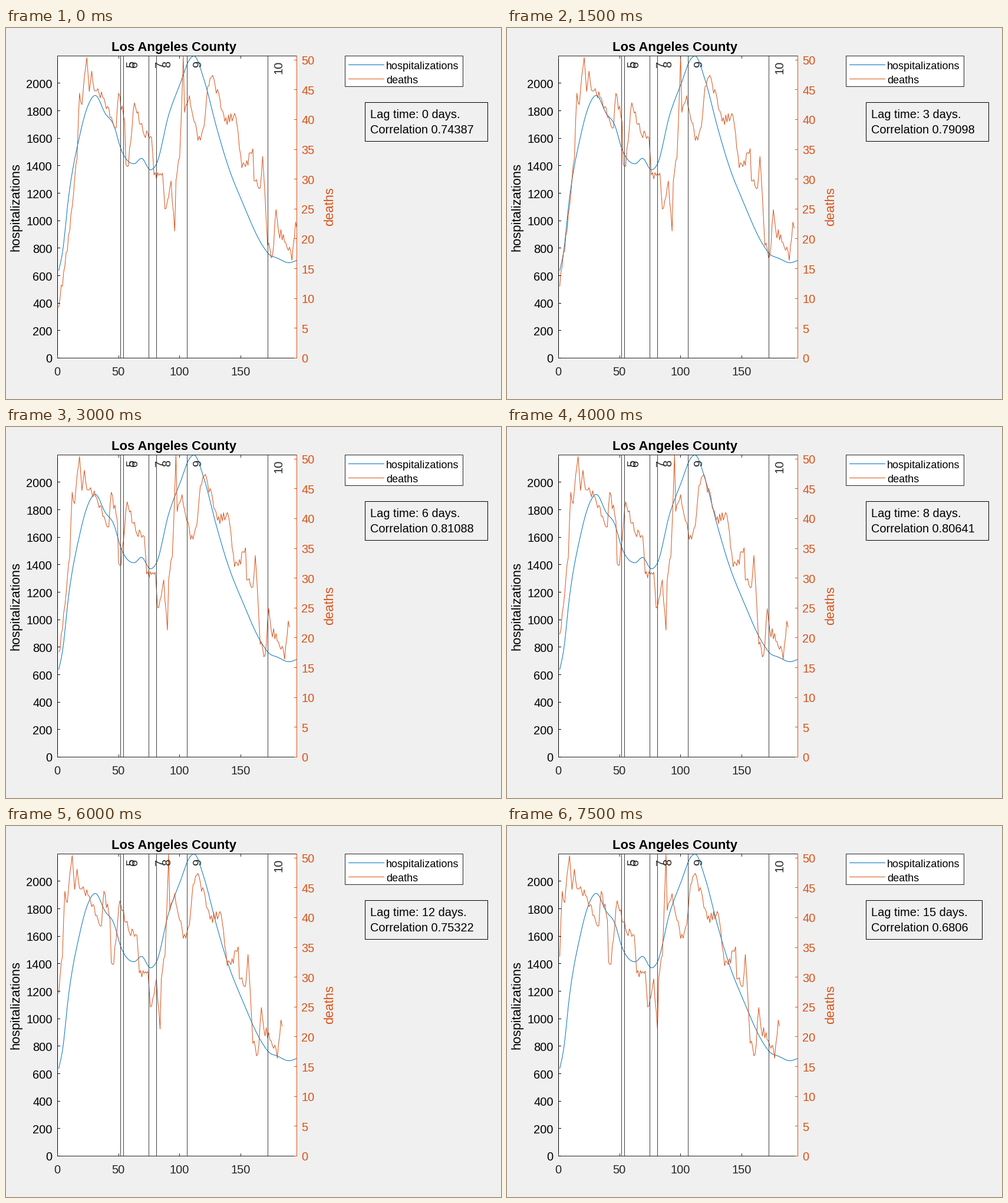
Animation, 840 px wide and 630 px high, one loop 8000 ms. Source, as a matplotlib script:

```python
import numpy as np
import matplotlib.pyplot as plt
from matplotlib.animation import FuncAnimation
from matplotlib.patches import Rectangle

plt.rcParams["font.family"] = "Liberation Sans"

W, H, DPI = 840, 630, 100
PX = 72 / DPI
X0, X1, Y0, Y1 = 87.5, 493.5, 560.5, 47.5
DAYS, LAGS, HOSP_MAX, DEATHS_MAX = 196, 16, 2199, 50.65
BLUE, ORANGE, DARK, RULE = "#0072BD", "#D95319", "#262626", "#404040"

# (day, patients): key points of a smooth curve
HOSP = [
    (1, 638), (4, 767), (9, 1169), (18, 1614), (24, 1816), (31, 1912),
    (39, 1781), (46, 1696), (52, 1520), (63, 1415), (69, 1454), (76, 1370),
    (81, 1413), (91, 1769), (100, 1987), (109, 2184), (112, 2199),
    (120, 2026), (130, 1687), (140, 1390), (151, 1143), (168, 818),
    (173, 757), (180, 728), (190, 694), (196, 711),
]

# (day, deaths): main turning points, with daily jitter between them
DEATHS = [
    (1, 8.5), (10, 21.4), (16, 33.5), (18, 44.4), (20, 42.5), (24, 50.4),
    (26, 44.7), (28, 48.1), (30, 44.9), (37, 43.7), (48, 38.6), (50, 44.4),
    (55, 39.6), (56, 32.5), (58, 32.2), (63, 42.8), (70, 38), (77, 37),
    (79, 30.7), (86, 31), (88, 25), (93, 29.7), (96, 21.3), (97, 29.7),
    (100, 33.6), (103, DEATHS_MAX), (104, 41.2), (108, 44), (115, 36.5),
    (120, 38.8), (123, 45.5), (127, 47.4), (137, 39.7), (146, 40.5),
    (151, 31.9), (154, 32.1), (160, 35.1), (161, 29.7), (166, 28.5),
    (168, 33.8), (172, 18.9), (176, 17.1), (179, 24.9), (181, 21.3),
    (190, 18.6), (192, 16.4), (195, 22.8), (196, 21.8),
]

# (lag, correlation): joined by one polynomial
CORR = [(0, 0.74387), (3, 0.79098), (6, 0.81088), (8, 0.80641),
        (10, 0.78763), (12, 0.75322), (15, 0.6806)]


def smooth(x, points):
    """Cubic Hermite curve through the points."""
    kx, ky = np.array(points, float).T
    slope = np.gradient(ky, kx)
    i = np.clip(np.searchsorted(kx, x, "right") - 1, 0, len(kx) - 2)
    h = kx[i + 1] - kx[i]
    t = (x - kx[i]) / h
    return ((1 + 2 * t) * (1 - t) ** 2 * ky[i] + t * t * (3 - 2 * t) * ky[i + 1]
            + h * t * (1 - t) * ((1 - t) * slope[i] - t * slope[i + 1]))


def jagged(x, points, amount):
    """Straight lines through the points with jitter on the other days."""
    kx, ky = zip(*points)
    noise = np.random.default_rng(4).uniform(-amount, amount, len(x))
    return np.interp(x, kx, ky) + np.where(np.isin(x, kx), 0, noise)


day = np.arange(1, DAYS + 1)
hosp = np.minimum(smooth(day, HOSP), HOSP_MAX)
deaths = jagged(day, DEATHS, 0.9)
corr = np.polyval(np.polyfit(*zip(*CORR), len(CORR) - 1), np.arange(LAGS))


def px(d):
    return X0 + d * (X1 - X0) / DAYS


def py(v, top):
    return Y0 - v * (Y0 - Y1) / top


fig = plt.figure(figsize=(W / DPI, H / DPI), dpi=DPI, facecolor="#F0F0F0")
ax = fig.add_axes([0, 0, 1, 1])
ax.set(xlim=(0, W), ylim=(H, 0))
ax.axis("off")


def curve(xs, ys, color, z):
    return ax.plot(xs, ys, color=color, lw=PX, zorder=z)[0]


# snapping adds half a pixel to straight edges, so take it off first
def line(x0, y0, x1, y1, color, z=5):
    ax.plot([x0 - 0.5, x1 - 0.5], [y0 - 0.5, y1 - 0.5], color=color, lw=PX,
            zorder=z, solid_capstyle="projecting")


def box(x0, y0, x1, y1, face, edge):
    return ax.add_patch(Rectangle((x0 - 0.5, y0 - 0.5), x1 - x0, y1 - y0,
                                  fc=face, ec=edge, lw=PX, zorder=1))


def label(x, y, s, size=20, color="black", ha="left", **kw):
    return ax.text(x, y, s, fontsize=size * PX, color=color, ha=ha,
                   va="baseline", rotation_mode="anchor", zorder=6, **kw)


# plot area, curves and numbered rules
box(X0, Y1, X1, Y0, "white", "none")
curve(px(day), py(hosp, HOSP_MAX), BLUE, 2)
moving = curve([], [], ORANGE, 3)
for n, x in enumerate((194.5, 199.5, 242.5, 255.5, 307.5, 444.5), 5):
    line(x, Y1, x, Y0, RULE, 4)
    label(x + 24, 56, str(n), color=DARK, ha="right", rotation=90)

# axes
line(X0, Y1, X1, Y1, DARK)
line(X0, Y0, X1, Y0, DARK)
line(X0, Y1, X0, Y0, "black")
line(X1, Y1, X1, Y0, ORANGE)
for d in range(0, DAYS, 50):
    x = px(d)
    line(x, Y0, x, Y0 - 4, DARK)
    line(x, Y1, x, Y1 + 4, DARK)
    label(x - 0.5, 590, str(d), color=DARK, ha="center")
for v in range(0, HOSP_MAX, 200):
    y = py(v, HOSP_MAX)
    line(X0, y, X0 + 4, y, "black")
    label(78.5, y + 8, str(v), ha="right")
for v in range(0, 51, 5):
    y = py(v, DEATHS_MAX)
    line(X1 - 4, y, X1, y, ORANGE)
    label(501.5, y + 8, str(v), color=ORANGE)
label(285, 39, "Los Angeles County", 22, ha="center", weight="bold")
label(23, 304, "hospitalizations", 22, ha="center", rotation=90)
label(555, 303.5, "deaths", 22, ORANGE, "center", rotation=90)

# legend
box(575.5, 47.5, 775.5, 99.5, "white", DARK)
for y, name, color in ((62.5, "hospitalizations", BLUE), (86.5, "deaths", ORANGE)):
    line(581.5, y, 641.5, y, color)
    label(645, y + 7, name, 18)

# readout
frame = box(609.5, 126.5, 817.5, 192.5, "none", "black")
lag_text = label(618, 153, "")
corr_text = label(618, 179, "")


def draw(lag):
    n = DAYS - lag
    moving.set_data(px(day[:n]), py(deaths[lag:], DEATHS_MAX))
    value = f"{corr[lag]:.5g}"
    lag_text.set_text(f"Lag time: {lag} days.")
    corr_text.set_text(f"Correlation {value}")
    frame.set_width(208 - 11 * (7 - len(value)))
    return moving, lag_text, corr_text, frame


anim = FuncAnimation(fig, draw, frames=LAGS, interval=500,
                     repeat=True, repeat_delay=0, blit=False)
plt.show()
```
